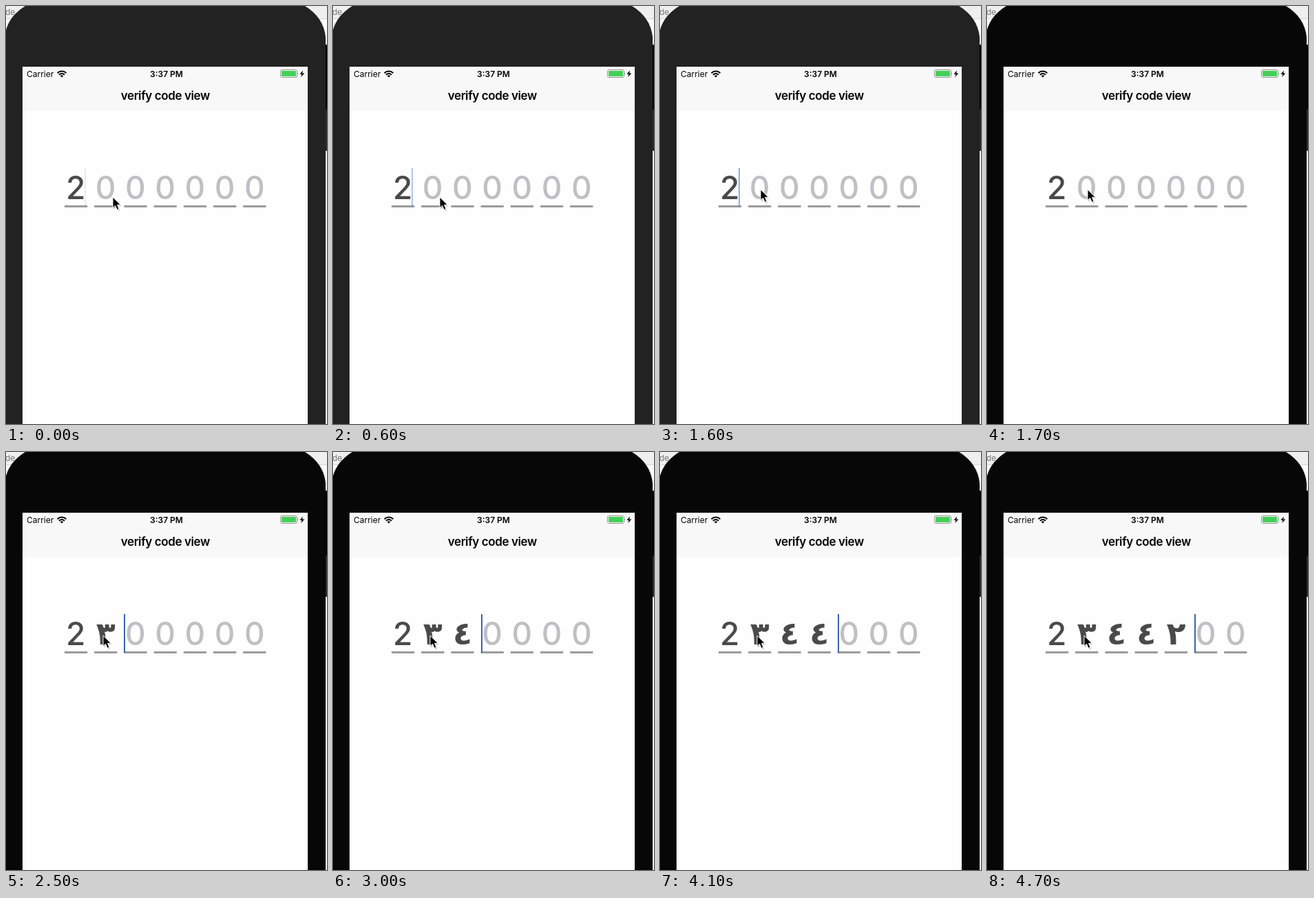
Recreate the animation shown at these times as an HTML page. Size 466 by 606 pixels, loop 5.1 s.

```html
<!DOCTYPE html>
<html lang="en">
<head>
<meta charset="utf-8">
<title>Verify code view</title>
<style>
  html, body { margin: 0; width: 100%; height: 100%; overflow: hidden; background: #fff; }
  svg { display: block; width: 466px; height: 606px; }
  text { font-family: Inter, "Open Sans", sans-serif; }

  /* every change is a hard cut on a 5.1 s loop */
  .body, .caret, .mouse, .cell { animation: 5.1s step-end infinite; }

  .body { fill: #222; animation-name: dim; }
  @keyframes dim { 0% { fill: #222; } 33.33% { fill: #070707; } }

  .caret { fill: #4068dc; animation-name: caret; }
  @keyframes caret {
    0%     { transform: translateX(114px); opacity: .13; fill: #4068dc; }
    1.96%  { transform: translateX(114px); opacity: 0; fill: #4068dc; }
    11.76% { transform: translateX(114px); opacity: .4; fill: #4068dc; }
    13.72% { transform: translateX(114px); opacity: 1; fill: #4068dc; }
    31.37% { transform: translateX(114px); opacity: .55; fill: #4068dc; }
    33.33% { transform: translateX(114px); opacity: 0; fill: #4068dc; }
    47.05% { transform: translateX(171px); opacity: 1; fill: #3b64b0; }
    58.82% { transform: translateX(215px); opacity: 1; fill: #3b64b0; }
    70.58% { transform: translateX(215px); opacity: .35; fill: #3b64b0; }
    72.54% { transform: translateX(215px); opacity: 0; fill: #3b64b0; }
    80.39% { transform: translateX(258px); opacity: 1; fill: #3b64b0; }
    92.15% { transform: translateX(301px); opacity: 1; fill: #3b64b0; }
  }

  .mouse { animation-name: mouse; }
  @keyframes mouse {
    0%     { transform: translate(155px, 277px); }
    21.56% { transform: translate(154px, 276px); }
    25.49% { transform: translate(152px, 273px); }
    27.45% { transform: translate(149px, 270px); }
    29.41% { transform: translate(146px, 266px); }
    39.21% { transform: translate(142px, 267px); }
    43.13% { transform: translate(141px, 266px); }
  }

  .digit { font-size: 46px; font-weight: 500; text-anchor: middle; fill: #4a4a4a; }
  .arabic { font-family: "DejaVu Sans", sans-serif; font-weight: 700; opacity: var(--on); }
  .empty { fill: #bfbfc4; opacity: calc(1 - var(--on)); }
  .cell { --on: 0; }
  .c1 { animation-name: type1; }
  .c2 { animation-name: type2; }
  .c3 { animation-name: type3; }
  .c4 { animation-name: type4; }
  @keyframes type1 { 0% { --on: 0; } 47.05%, 100% { --on: 1; } }
  @keyframes type2 { 0% { --on: 0; } 58.82%, 100% { --on: 1; } }
  @keyframes type3 { 0% { --on: 0; } 80.39%, 100% { --on: 1; } }
  @keyframes type4 { 0% { --on: 0; } 92.15%, 100% { --on: 1; } }
</style>
</head>
<body>
<svg viewBox="0 0 466 606">
  <!-- desktop behind the phone -->
  <rect width="466" height="606" fill="#fafafa"/>
  <rect width="466" height="18" fill="#f0eff0"/>
  <rect y="18" width="466" height="1" fill="#d6d6d6"/>
  <text x="-1" y="13" font-size="12" fill="#777">de</text>
  <rect x="463" y="56" width="3" height="94" fill="#000"/>
  <rect x="463" y="150" width="3" height="60" fill="#2a2a2a"/>
  <rect x="464" y="210" width="2" height="396" fill="#ececec"/>

  <path class="body" d="M-2 606V45C0 26 10 11 28 0H434C452 11 462 26 464 45V606Z"/>
  <rect x="24" y="88" width="414" height="518" fill="#fefefe"/>
  <rect x="24" y="88" width="414" height="64" fill="#f8f8f8"/>

  <!-- status bar -->
  <text x="30" y="103" font-size="12">Carrier</text>
  <g fill="none" stroke="#000" stroke-width="2">
    <path d="M74.6 97.2a9 9 0 0 1 12.8 0M77 99.7a5.7 5.7 0 0 1 8 0"/>
  </g>
  <path d="M81 103.6l-2.2-2.3a3.2 3.2 0 0 1 4.4 0Z"/>
  <text x="233" y="102.5" font-size="12" font-weight="600" text-anchor="middle">3:37 PM</text>
  <rect x="398.5" y="92.5" width="24" height="11" rx="2.5" fill="#fff" stroke="#8f8f8f"/>
  <rect x="400" y="94" width="21" height="8" rx="1.2" fill="#43cf57"/>
  <path d="M423.5 96v4q1.6-2 0-4Z" fill="#8f8f8f"/>
  <path d="M431 93.5l-4.6 5.3h3l-1.2 4.2 5.2-5.6h-3.2Z"/>

  <text x="231.3" y="136" font-size="17" font-weight="600" letter-spacing="-.41" text-anchor="middle">verify code view</text>

  <!-- code field -->
  <path d="M85 290.5H378" stroke="#9b9b9b" stroke-width="3" stroke-dasharray="33.2 10"/>
  <text class="digit" x="101.3" y="280">2</text>
  <g id="cells"></g>
  <rect class="caret" y="235" width="2" height="56"/>

  <g class="mouse">
    <path d="M1 2v16l4-3.6 2.7 6 3-1.3-2.7-5.9h5.2Z" fill="#000" opacity=".18"/>
    <path d="M0 0V15.6L3.6 12.3 6.2 18.4 9 17.2 6.5 11.3H11.4Z" fill="#000" stroke="#fff" stroke-width="1"/>
  </g>
</svg>
<script>
  const typed = ["٣", "٤", "٤", "٢", "", ""];
  document.getElementById("cells").innerHTML = typed.map((digit, i) => {
    const x = 144.7 + i * 43.25;
    return `<g class="cell c${i + 1}">
      <text class="digit empty" x="${x}" y="280">0</text>
      <text class="digit arabic" x="${x}" y="279">${digit}</text>
    </g>`;
  }).join("");
</script>
</body>
</html>
```
